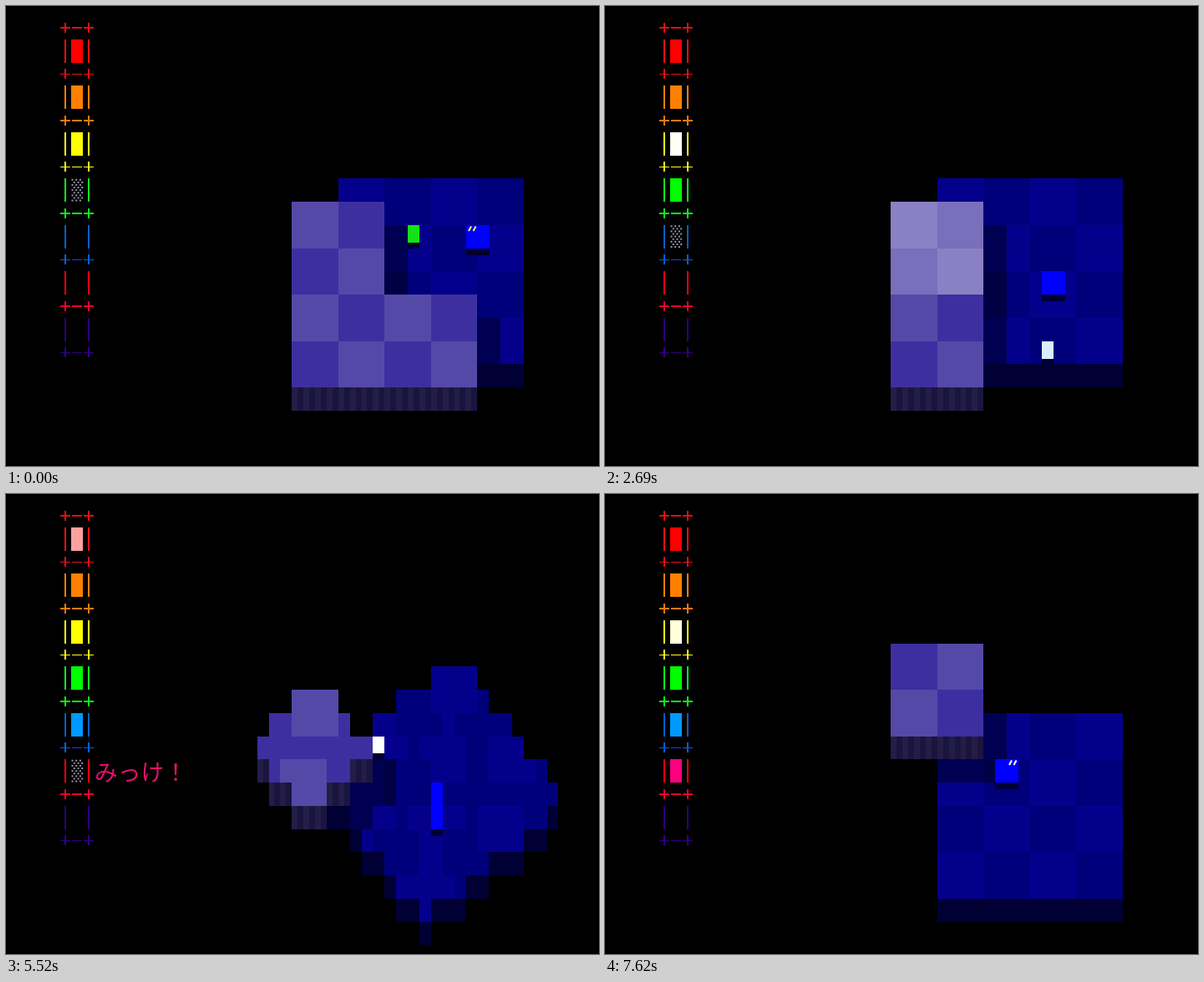
Recreate the animation shown at these times as an HTML page with a canvas. Size 710 by 550 pixels, loop 7650 ms.

```html
<!DOCTYPE html>
<html lang="ja">
<head>
<meta charset="utf-8">
<style>
html, body { margin: 0; width: 710px; height: 550px; overflow: hidden; background: #000; }
canvas { display: block; }
#found {
  position: absolute; left: 106px; top: 317px;
  font: 27.75px/28px "Noto Sans CJK JP", "Noto Sans CJK", sans-serif;
  color: #e4106e; white-space: nowrap;
}
</style>
</head>
<body>
<canvas id="stage" width="710" height="550"></canvas>
<div id="found" hidden>みっけ！</div>
<script>
const ctx = document.getElementById('stage').getContext('2d');
const found = document.getElementById('found');
const LOOP = 7650, CX = 481, CY = 345, W = 13.875, H = 27.75, TILE = 55.5;

// Value of the last entry whose time has passed
const at = (list, t) => list.reduce((cur, e) => e[0] <= t ? e : cur);
const clamp = v => Math.max(0, Math.min(1, v));
const lighten = (rgb, w) => `rgb(${rgb.map(v => Math.round(v + (255 - v) * w))})`;

function rect(color, x, y, w, h) {
  const l = Math.round(x), t = Math.round(y);
  ctx.fillStyle = color;
  ctx.fillRect(l, t, Math.round(x + w) - l, Math.round(y + h) - t);
}

// ---- Board ----
const turns = [[0, 0], [5390, 24], [5520, 52], [5650, 72], [5800, 90]];
const blocks = [
  { c: 2, r: 3, from: 250, to: 1850 },
  { c: 0, r: 1, from: 2100, to: 4020 },
  { c: 0, r: 3, from: 9000, to: 9999 }
];
const inside = (p, c, r, n) => p.c >= c && p.c < c + n && p.r >= r && p.r < r + n;

function spin(x, y, deg) {
  const a = deg * Math.PI / 180, c = Math.cos(a), s = Math.sin(a);
  return [x * c - y * s, x * s + y * c];
}

function drawBoard(t, deg) {
  const tile = (x, y) => {
    const [u, v] = spin(x, y, -deg);
    return { c: Math.floor(u / TILE + 2.5), r: Math.floor(v / TILE + 2.5) };
  };
  const blockAt = p => blocks.find(b => t < b.to && inside(p, b.c, b.r, 2));
  const odd = p => (p.c + p.r) & 1;

  for (let j = -8; j < 8; j++) for (let i = -16; i < 16; i++) {
    const px = i * W, py = j * H, x = px + W / 2, y = py + H / 2;
    const put = color => rect(color, CX + px, CY + py, W, H);
    const here = tile(x, y), above = tile(x, y + H), top = blockAt(above);
    if (top) {
      const w = clamp((t - top.from) / (top.to - top.from));
      put(lighten(odd(above) ? [85, 73, 168] : [61, 47, 160], w));
    } else if (blockAt(here)) {
      put('#241e46');
      rect('#1a153e', CX + px + W / 2, CY + py, W / 2, H);
    } else if (inside(here, 1, 0, 4)) {
      const dark = [[H, 0], [0, H], [H, H]].some(([dx, dy]) => blockAt(tile(x - dx, y - dy)));
      put(dark ? (odd(here) ? '#000052' : '#000043') : (odd(here) ? '#05008c' : '#00007b'));
    } else if (inside(tile(x, y - H), 1, 0, 4)) {
      put('#000034');
    }
  }
}

// ---- Gems ----
const gems = [
  { slot: 3, seen: 0, got: 410, x: 481, y: 262, rgb: [20, 225, 24], peak: 493 },
  { slot: 4, seen: 1850, got: 3080, x: 523, y: 401, rgb: [0, 153, 255], peak: 5520 },
  { slot: 5, seen: 5250, got: 7000, turning: true, rgb: [255, 0, 128], peak: 5520 }
];

function drawGem(g, t, deg) {
  if (t < g.seen || t >= g.got || (g.turning && !deg)) return;
  let { x, y } = g;
  if (g.turning) {
    const [dx, dy] = spin(-56, 8, deg);
    x = CX + Math.round((dx - W / 2) / W) * W;
    y = CY + Math.round((dy - H / 2) / H) * H;
  }
  const w = (1 + Math.cos((t - g.peak) / 985 * 2 * Math.PI)) / 2;
  rect('#000030', x, y + 20, W, 7.5);
  rect(lighten(g.rgb, w), x, y, W, 20.5);
}

// ---- Player: time, left, top, facing ----
const path = [
  [0, 551, 262, -1], [130, 523, 262, -1], [280, 495, 262, -1], [410, 467, 262, -1],
  [670, 467, 290, -1], [1740, 495, 290, 1], [1870, 523, 290, 1], [2020, 523, 317, 0],
  [2820, 523, 345, 1], [2950, 523, 373, 1], [3080, 523, 401, 1], [3230, 523, 373, 0],
  [3360, 523, 345, 1], [3770, 523, 317, 0], [3890, 523, 290, 0], [4740, 509, 290, -1],
  [5110, 509, 317, -1], [5800, 481, 373, -1], [6200, 467, 373, -1], [6600, 467, 345, 0],
  [6730, 467, 317, 1], [6860, 467, 290, 0], [7000, 467, 262, 0], [7250, 467, 290, 1],
  [7380, 467, 317, 1]
];

function drawPlayer(t, deg) {
  let [, x, y, face] = at(path, t), w = 2 * W, h = H;
  if (deg > 0 && deg < 90) {
    const [dx, dy] = spin(x + W - CX, y + H / 2 - CY, deg);
    w = W; h = 2 * H; face = 0;
    x = CX + Math.round((dx - W / 2) / W) * W;
    y = CY + Math.round((dy - H) / H) * H;
  }
  rect('#000033', x, y + h, w, 8);
  rect('#0000ff', x, y, w, h);
  if (!face) return;
  const left = x + (face < 0 ? 2 : 16);
  ctx.strokeStyle = t < 130 ? '#ffff50' : '#fff';
  ctx.lineWidth = 2;
  ctx.beginPath();
  for (const k of [0, 5.5]) {
    ctx.moveTo(left + k + 4, y + 1.5);
    ctx.lineTo(left + k + 1, y + 7);
  }
  ctx.stroke();
}

// ---- Legend ----
const fills = [[255, 0, 0], [255, 128, 0], [255, 255, 0], [0, 255, 0], [0, 153, 255], [255, 0, 128]];
const bars = ['#f01010', '#ff8000', '#ffff20', '#10f020', '#0060c8', '#ff0010', '#2b0080'];
const rules = ['#e01010', '#e81018', '#f07810', '#ffff20', '#10f020', '#0060d8', '#ff0030', '#330088'];

function drawSlot(i, t) {
  const y = 39.75 + i * TILE, gem = gems.find(g => g.slot === i);
  rect(bars[i], 70, y, 2, H);
  rect(bars[i], 98, y, 2, H);
  if (i > 5 || (gem && t < gem.seen)) return;
  if (gem && t < gem.got) {
    ctx.fillStyle = '#9494a8';
    for (let r = 0; r < 9; r++) for (let c = 0; c < 3; c++)
      ctx.fillRect(78.5 + c * 4.7 + (r & 1) * 2.3, y + 0.5 + r * 3.1, 2, 2);
    return;
  }
  if (i === 0 && t >= 6700 && t < 6860) {
    rect('#a01028', 78, y, 14, H);
    rect('#2b0006', 79, y + 1, 12, H - 2);
    return;
  }
  const shine = clamp(1 - Math.abs(t % 1635 - (560 + 250 * i)) / 150);
  rect(lighten(fills[i], shine), 78, y, 14, H);
}

function drawLegend(t) {
  rules.forEach((color, i) => {
    const y = 25.5 + i * TILE;
    for (const x of [71, 99]) {
      rect(color, x - 6, y - 0.5, 12, 1.5);
      rect(color, x - 1, y - 6, 2, 12);
    }
    rect(i === 5 ? '#3030ff' : color, 79, y - 0.5, 12, 1.5);
  });
  bars.forEach((_, i) => drawSlot(i, t));
}

function draw(now) {
  const t = now % LOOP, deg = at(turns, t)[1];
  rect('#000', 0, 0, 710, 550);
  drawLegend(t);
  drawBoard(t, deg);
  gems.forEach(g => drawGem(g, t, deg));
  drawPlayer(t, deg);
  found.hidden = t < 5250 || t >= 6400;
}

const start = performance.now();
(function tick() {
  draw(performance.now() - start);
  requestAnimationFrame(tick);
})();
</script>
</body>
</html>
```
